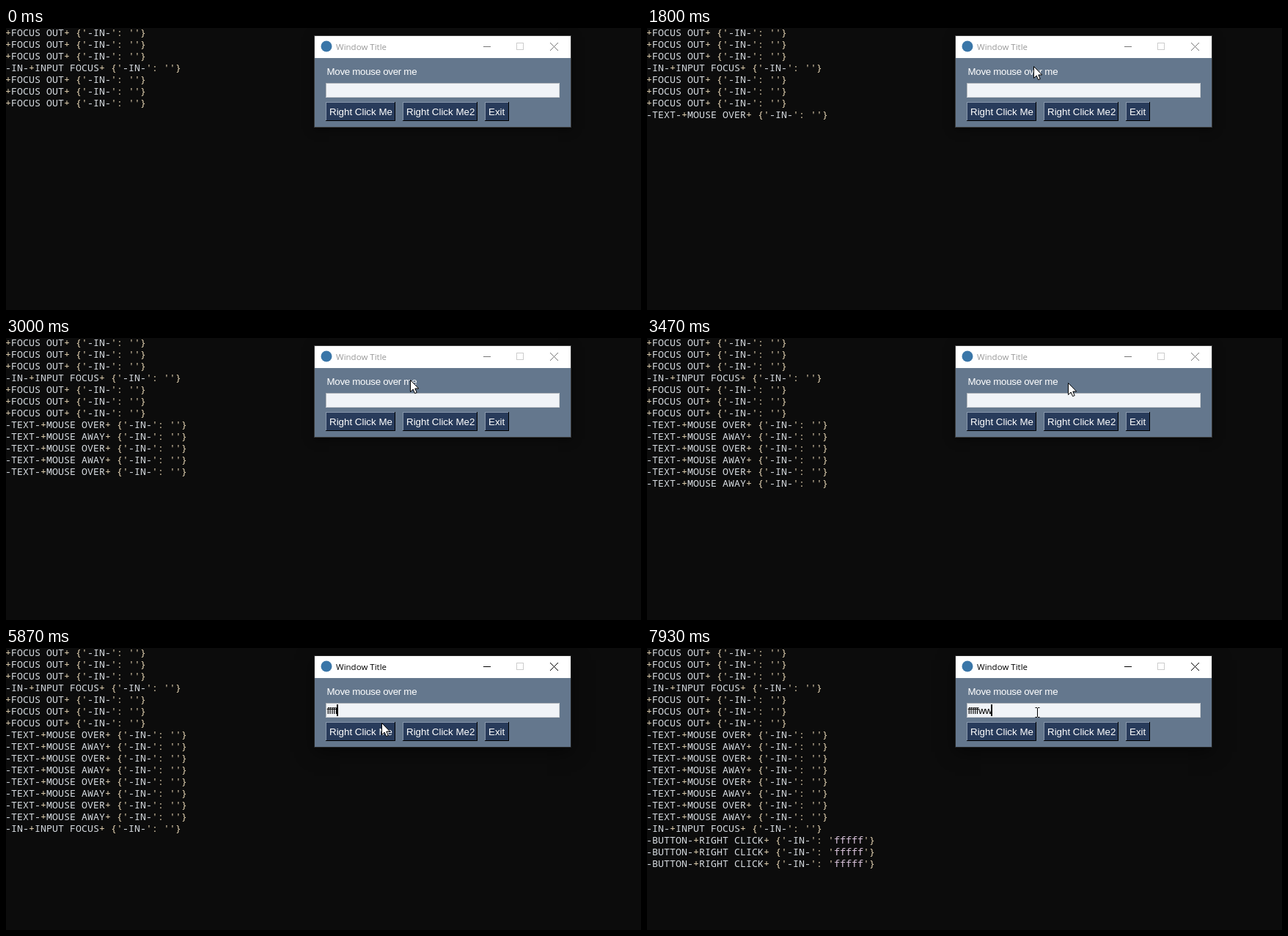
Write an HTML page with a canvas that moves like this. It is 866 by 385 pixels and loops after 8 s.

```html
<!DOCTYPE html>
<html lang="en">
<head>
<meta charset="utf-8">
<title>Window events</title>
<style>
html, body { margin: 0; width: 866px; height: 385px; overflow: hidden; background: #0c0c0c; }
canvas { display: block; }
</style>
</head>
<body>
<canvas id="stage" width="866" height="385"></canvas>
<script>
const ctx = document.getElementById('stage').getContext('2d');
const SANS = '13.33px "Liberation Sans", Arial, sans-serif';
const MONO = '13.333px "Noto Sans Mono", "DejaVu Sans Mono", monospace';
const TITLE = '11.5px "Open Sans", "Noto Sans", sans-serif';

// All times are in ticks, 15 per second.
const LOOP = 120, FOCUS = 60, FIRST_CLICK = 92, CLICK_GAP = 6, CLICKS = 3;
const KEY_GAP = 3.75, BLINK = 13, BLINK_ON = 9;
const SWING = { start: 34, end: 54, period: 8.2 };

// Pointer moves: start tick, end tick, x, y
const moves = [
  [0, 3, 831, 345], [6, 16, 574, 156], [16, 19, 538, 103], [19, 23, 527, 70],
  [24, 27, 527, 52], [31, 34, 591, 50], [54, 57, 523, 88],
  [84, 89, 509, 106], [108, 111, 532, 88]
];

function swingAt(tick) {
  const t = tick - SWING.start;
  return [565 + 26 * Math.cos(2 * Math.PI * t / SWING.period), 50 + 0.6 * t];
}

function pointerAt(tick) {
  let x = 880, y = 400;
  for (const [start, end, toX, toY] of moves) {
    if (tick < start) break;
    if (start >= SWING.end) [x, y] = start === SWING.end ? swingAt(start) : [x, y];
    const k = Math.min(1, (tick - start) / (end - start));
    x += (toX - x) * k;
    y += (toY - y) * k;
  }
  if (tick >= SWING.start && tick < SWING.end) [x, y] = swingAt(tick);
  return [Math.round(x), Math.round(y)];
}

const inside = ([x, y], left, top, right, bottom) =>
  x > left && x < right && y > top && y < bottom;

// Hovering, focus and clicks write the console lines.
function buildLog() {
  const out = Array(7).fill('+FOCUS OUT+');
  out[3] = '-IN-+INPUT FOCUS+';
  const log = out.map(event => ({ tick: 0, event, value: '' }));
  const add = (tick, event, value = '') => log.push({ tick, event, value });
  let over = false;
  for (let tick = 0; tick < FOCUS; tick++) {
    const now = inside(pointerAt(tick), 436, 50, 562, 68);
    if (now !== over) add(tick, `-TEXT-+MOUSE ${now ? 'OVER' : 'AWAY'}+`);
    over = now;
  }
  add(FOCUS, '-IN-+INPUT FOCUS+');
  for (let i = 0; i < CLICKS; i++) {
    add(FIRST_CLICK + i * CLICK_GAP, '-BUTTON-+RIGHT CLICK+', 'fffff');
  }
  return log;
}
const log = buildLog();

function typedPart(str, start, tick) {
  return str.slice(0, Math.max(0, Math.floor((tick - start) / KEY_GAP) + 1));
}

function rect(x, y, w, h, color) {
  ctx.fillStyle = color;
  ctx.fillRect(x, y, w, h);
}

function text(str, x, y, font, color, spacing = 0) {
  ctx.font = font;
  ctx.letterSpacing = spacing + 'px';
  ctx.fillStyle = color;
  ctx.fillText(str, x, y);
}

function lines(color, ...segments) {
  ctx.strokeStyle = color;
  ctx.lineWidth = 1;
  ctx.beginPath();
  for (const [x1, y1, x2, y2] of segments) {
    ctx.moveTo(x1, y1);
    ctx.lineTo(x2, y2);
  }
  ctx.stroke();
}

function bevel(x, y, w, h, light, dark, fill) {
  rect(x, y, w, h, dark);
  rect(x, y, w - 1, h - 1, light);
  rect(x + 1, y + 1, w - 2, h - 2, fill);
}

function drawLog(tick) {
  log.forEach(({ tick: start, event, value }, row) => {
    if (tick < start) return;
    let col = 0;
    for (const part of `${event} {'-IN-': '${value}'}`.split(/([{}'+:]+|f+)/)) {
      const color = /^f/.test(part) ? '#dcc6de' : /^[{}'+:]/.test(part) ? '#e6d5b4' : '#d8dde2';
      text(part, col * 8 - 1, 11 + row * 16, MONO, color);
      col += part.length;
    }
  });
}

function drawButton(label, x, w) {
  bevel(x, 101, w, 26, '#8796ab', '#000', '#283b5b');
  text(label, x + 5, 119, SANS, '#fff');
}

function drawWindow(tick) {
  const active = tick >= FOCUS;
  const ink = active ? '#000' : '#999';
  const glyph = active ? '#000' : '#777';

  ctx.save();
  ctx.shadowColor = 'rgba(0,0,0,.5)';
  ctx.shadowBlur = active ? 22 : 12;
  ctx.shadowOffsetY = active ? 6 : 2;
  rect(420, 10, 351, 126, active ? '#222' : '#3a3a3a');
  ctx.restore();

  rect(421, 11, 349, 30, '#fff');
  rect(421, 41, 349, 94, '#64778d');

  ctx.fillStyle = '#3a76a8';
  ctx.beginPath();
  ctx.arc(437, 25, 7.5, 0, 7);
  ctx.fill();
  text('Window Title', 450, 30, TITLE, ink);

  lines(glyph, [651, 25.5, 661, 25.5], [742, 20, 753, 31], [753, 20, 742, 31]);
  ctx.strokeStyle = '#ccc';
  ctx.strokeRect(696.5, 20.5, 9, 9);

  text('Move mouse over me', 437.5, 64, SANS, '#fff', -0.3);
  bevel(436, 75, 319, 20, '#b0b5ba', '#d0d3d6', '#f0f3f7');
  drawButton('Right Click Me', 436, 95);
  drawButton('Right Click Me2', 541, 102);
  drawButton('Exit', 653, 33);

  const typed = typedPart('fffff', 68, tick) + typedPart('ww', 115, tick);
  text(typed, 437.5, 90, SANS, '#000', -0.63);
  if (active && (tick - FOCUS + BLINK - 1) % BLINK < BLINK_ON) {
    rect(437 + Math.round(ctx.measureText(typed).width), 77, 2, 16, '#000');
  }
}

function drawPointer(tick) {
  const [x, y] = pointerAt(tick);
  ctx.save();
  if (inside([x, y], 436, 75, 755, 95)) {
    ctx.translate(x + 0.5, y);
    lines('#000', [0, -6, 0, 6], [-3, -6.5, -0.5, -6.5], [0.5, -6.5, 3, -6.5],
      [-3, 6.5, -0.5, 6.5], [0.5, 6.5, 3, 6.5]);
  } else {
    ctx.translate(x, y);
    const arrow = new Path2D('M.5 .5V16.5L4.2 13L6.6 18.6L9.2 17.5L6.8 12H11.7Z');
    ctx.fillStyle = '#fff';
    ctx.strokeStyle = '#000';
    ctx.fill(arrow);
    ctx.stroke(arrow);
  }
  ctx.restore();
}

function draw() {
  const tick = Math.floor(performance.now() * 0.015 + 0.06) % LOOP;
  rect(0, 0, 866, 385, '#0c0c0c');
  drawLog(tick);
  drawWindow(tick);
  drawPointer(tick);
  requestAnimationFrame(draw);
}
draw();
</script>
</body>
</html>
```
